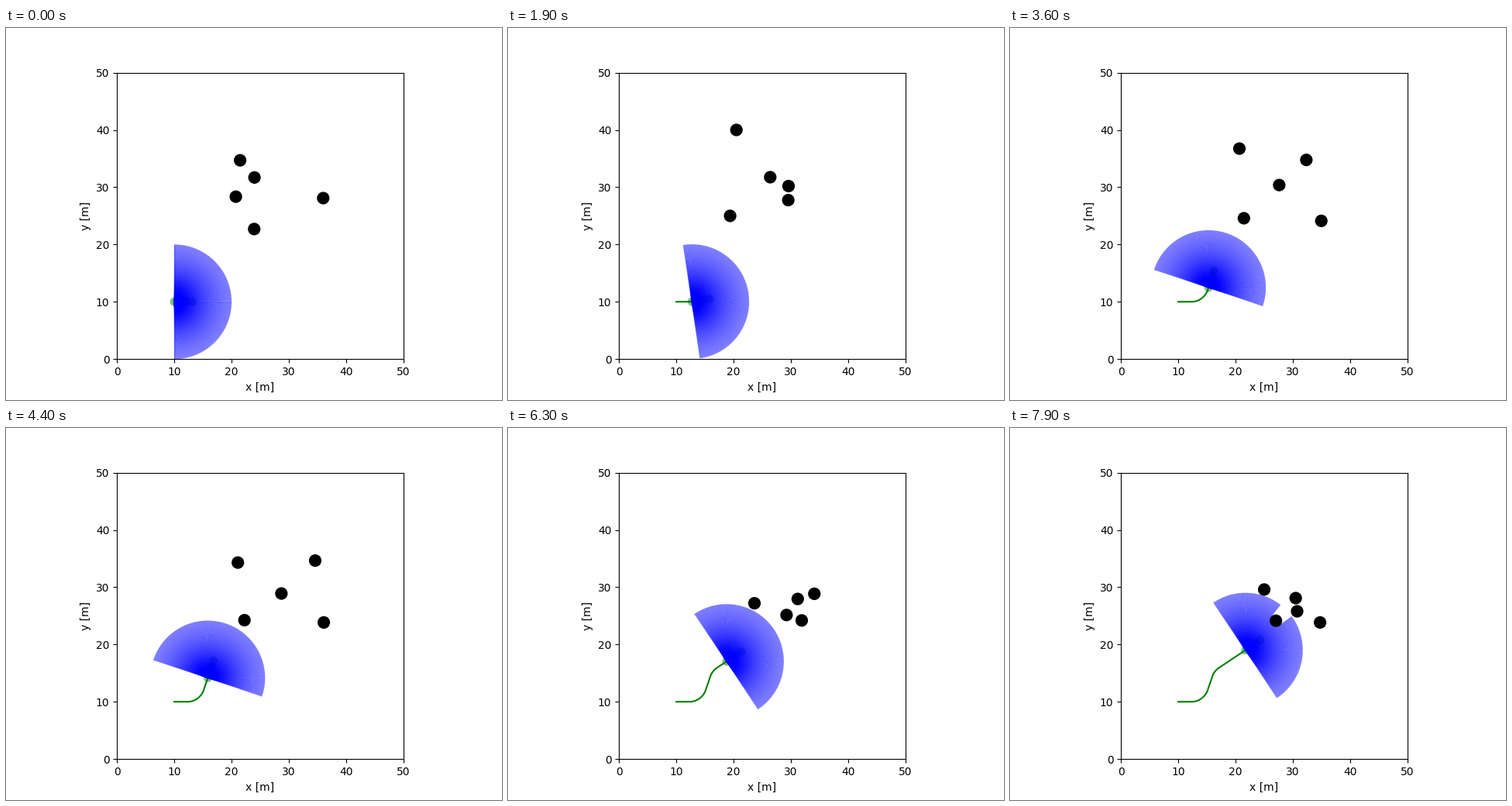
Animation of 640x480 px, one loop 8 s. Source, as a matplotlib script:

```python
import numpy as np
import matplotlib.pyplot as plt
from matplotlib.animation import FuncAnimation
from matplotlib.collections import LineCollection
from matplotlib.patches import Circle

FRAMES, INTERVAL = 80, 100
SUB = 20                      # integration steps per frame
RANGE, RADIUS = 10.0, 1.0     # sensor reach, obstacle size in metres

# Way points of the moving obstacles: (x, y) at each of TIMES (seconds)
TIMES = np.array([0, 1.9, 2.8, 4.4, 5.3, 6.3, 7.9])
WAYPOINTS = np.array([
    [(21.5, 34.7), (20.5, 40.0), (20.5, 38.6), (21.1, 34.3),
     (22.0, 30.85), (23.65, 27.2), (27.05, 24.15)],
    [(20.75, 28.35), (26.4, 31.75), (29.6, 33.55), (34.6, 34.65),
     (36.0, 31.75), (34.1, 28.85), (30.75, 25.8)],
    [(24.0, 31.7), (29.55, 27.75), (32.6, 25.75), (36.1, 23.85),
     (34.8, 26.6), (31.2, 27.95), (25.0, 29.6)],
    [(36.0, 28.1), (29.6, 30.2), (27.25, 30.7), (28.7, 28.9),
     (28.85, 25.35), (31.9, 24.2), (34.75, 23.85)],
    [(23.95, 22.7), (19.4, 25.0), (21.1, 24.85), (22.25, 24.25),
     (25.5, 23.85), (29.25, 25.15), (30.5, 28.1)],
])
SLOPES = np.gradient(WAYPOINTS, TIMES, axis=1, edge_order=2)


def obstacles_at(t):
    """Cubic Hermite interpolation between the way points."""
    k = min(np.searchsorted(TIMES, t, side="right") - 1, len(TIMES) - 2)
    h = TIMES[k + 1] - TIMES[k]
    u = (t - TIMES[k]) / h
    p, q = WAYPOINTS[:, k], WAYPOINTS[:, k + 1]
    a, b = h * SLOPES[:, k], h * SLOPES[:, k + 1]
    return ((1 + 2 * u) * (1 - u) ** 2 * p + u * (1 - u) ** 2 * a
            + u * u * (3 - 2 * u) * q + u * u * (u - 1) * b)


def heading_at(t):
    return np.radians(np.interp(t, [1.7, 3.4, 4.5, 5.4], [0, 71.5, 71.5, 33.7]))


def drive():
    """Robot positions from speed and heading, SUB steps per frame."""
    dt = INTERVAL / 1000 / SUB
    t = (np.arange(FRAMES * SUB) + 0.5) * dt
    speed = np.interp(t, [0, 1.35], [0, 2.22])
    angle = heading_at(t)
    step = speed[:, None] * np.column_stack([np.cos(angle), np.sin(angle)]) * dt
    return np.vstack([[10, 10], [10, 10] + np.cumsum(step, axis=0)])


def scan(pos, heading, centers):
    """Ray segments, cut where they first meet an obstacle."""
    angles = heading + np.radians(np.arange(-90, 91))
    rays = np.column_stack([np.cos(angles), np.sin(angles)])
    reach = np.full(len(rays), RANGE)
    for d in centers - pos:
        along = rays @ d
        disc = RADIUS ** 2 - (d @ d - along ** 2)
        hit = along - np.sqrt(np.maximum(disc, 0))
        blocked = (disc > 0) & (hit > 0)
        reach[blocked] = np.minimum(reach[blocked], hit[blocked])
    ends = pos + rays * reach[:, None]
    return np.stack([np.broadcast_to(pos, ends.shape), ends], axis=1)


PATH = drive()

fig, ax = plt.subplots(figsize=(6.4, 4.8), dpi=100)
ax.set_aspect("equal")
ax.set_xlim(0, 50)
ax.set_ylim(0, 50)
ax.set_xlabel("x [m]")
ax.set_ylabel("y [m]")

trail, = ax.plot([], [], color="green", lw=1.5)
body = [ax.add_patch(Circle((0, 0), 0.75, fc="green", ec="none", alpha=0.5))
        for _ in range(4)]
dots = [ax.add_patch(Circle((0, 0), RADIUS, color="black", zorder=4))
        for _ in WAYPOINTS]
beams = LineCollection([], colors="blue", linewidths=1, alpha=0.5, zorder=3)
ax.add_collection(beams, autolim=False)


def update(i):
    t = i * INTERVAL / 1000
    pos, heading = PATH[i * SUB], heading_at(t)
    centers = obstacles_at(t)
    trail.set_data(*PATH[:i * SUB + 1].T)
    ahead = np.array([np.cos(heading), np.sin(heading)])
    for k, part in enumerate(body):
        part.center = pos + ahead * k * 3.1 / 3
    for dot, c in zip(dots, centers):
        dot.center = c
    beams.set_segments(scan(pos, heading, centers))
    return [trail, beams, *body, *dots]


anim = FuncAnimation(fig, update, frames=FRAMES, interval=INTERVAL,
                     repeat=True, repeat_delay=0, blit=False)
plt.show()
```
